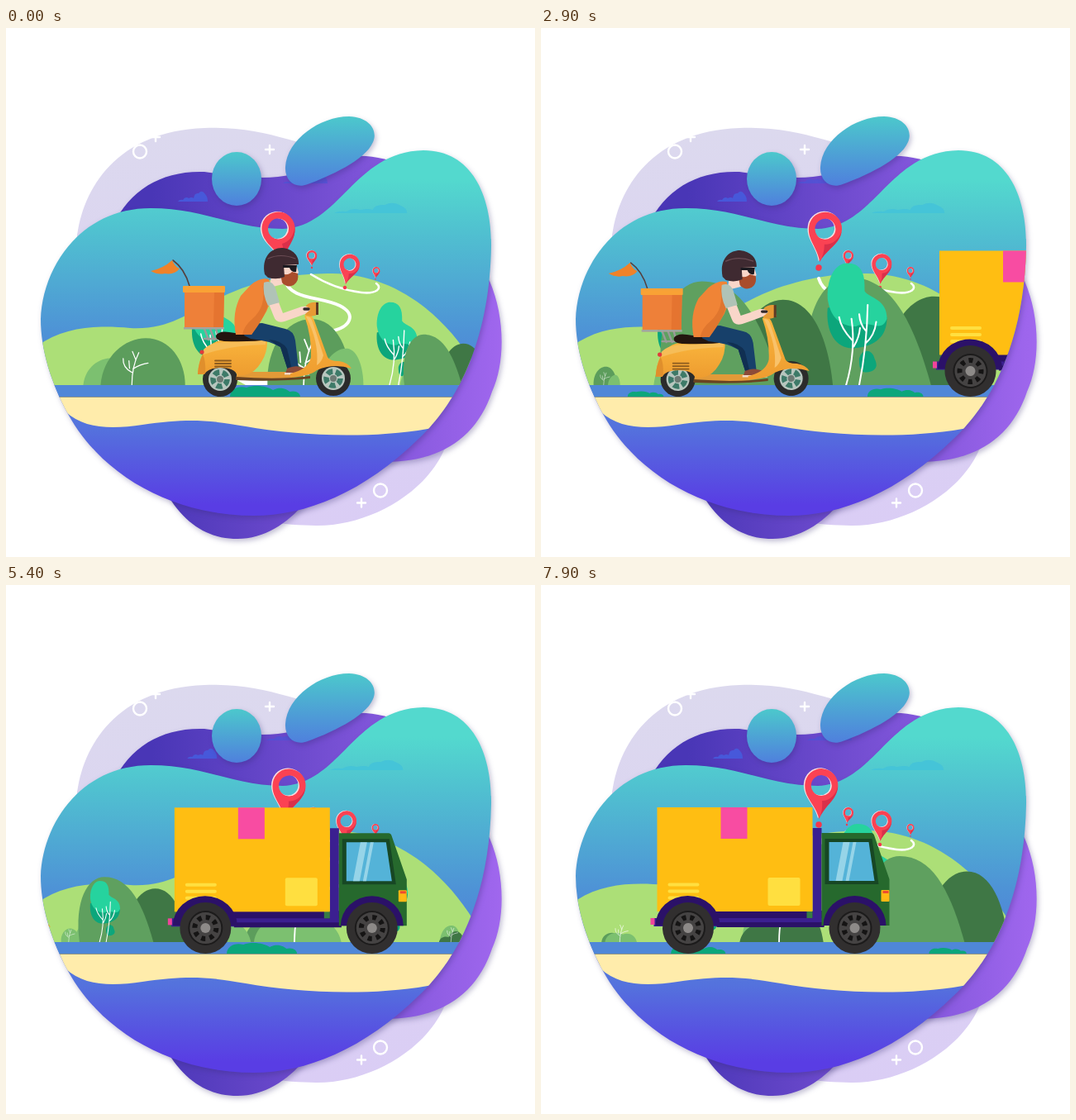
Animation, 640 px wide and 640 px high, one loop 8000 ms. Source, as an HTML page:

```html
<!DOCTYPE html>
<html lang="en">
<head>
<meta charset="utf-8">
<title>Delivery ride</title>
<style>
html, body { margin: 0; width: 100%; height: 100%; overflow: hidden; background: #fff; }
svg { display: block; width: 100vw; height: 100vh; }
.soft { filter: drop-shadow(2px 3px 3px rgba(50, 40, 110, .3)); }
.line { fill: none; stroke-linecap: round; stroke-linejoin: round; }
</style>
</head>
<body>
<svg viewBox="0 0 640 640" xmlns="http://www.w3.org/2000/svg">
  <defs>
    <linearGradient id="sky" gradientUnits="userSpaceOnUse" x1="0" y1="148" x2="0" y2="590">
      <stop offset=".08" stop-color="#53d9ce"/>
      <stop offset=".22" stop-color="#50c1d0"/>
      <stop offset=".5" stop-color="#4e92d6"/>
      <stop offset=".76" stop-color="#5472dd"/>
      <stop offset=".97" stop-color="#593de4"/>
    </linearGradient>
    <linearGradient id="violet" gradientUnits="userSpaceOnUse" x1="130" y1="0" x2="600" y2="0">
      <stop offset=".1" stop-color="#4936b6"/>
      <stop offset="1" stop-color="#a067ee"/>
    </linearGradient>
    <linearGradient id="drop" x1="0" y1="0" x2="0" y2="1">
      <stop offset="0" stop-color="#4cc8cc"/>
      <stop offset="1" stop-color="#4f80dd"/>
    </linearGradient>
    <linearGradient id="haze" x1="0" y1="0" x2="0" y2="1">
      <stop offset="0" stop-color="#dcd9ee"/>
      <stop offset="1" stop-color="#dacdf5"/>
    </linearGradient>
    <linearGradient id="paint" x1="0" y1="0" x2="0" y2="1">
      <stop offset="0" stop-color="#f9b53c"/>
      <stop offset="1" stop-color="#ee9c30"/>
    </linearGradient>
    <path id="blob" d="M42 352C44 290 90 218 175 218C240 218 275 243 335 243C405 240 420 150 505 148C565 148 588 205 587 265C585 370 552 440 512 484C440 560 365 590 300 590C200 590 115 540 75 467C55 430 42 390 42 352Z"/>
    <clipPath id="stage"><use href="#blob"/></clipPath>

    <path id="marker" fill-rule="evenodd" d="M0 -7C-6 -25-20 -31-20 -48A20 20 0 0 1 20 -48C20 -31 6 -25 0 -7ZM0 -60A12.5 12.5 0 1 0 0 -35A12.5 12.5 0 1 0 0 -60Z"/>
    <g id="pin">
      <use href="#marker" x="-1.500" y="-.7" fill="#fbdde0"/>
      <use href="#marker" fill="#fb4253"/>
      <path fill="#d9304a" d="M0 -7C6 -25 20 -31 20 -48C17 -34 9 -30 2 -29Q4 -18 0 -7Z"/>
      <circle r="3.7" fill="#f5374b"/>
    </g>

    <g id="twig" class="line" stroke="#fff" stroke-width="1.8">
      <path d="M-2 0Q-2 -32 10 -56M-2 -22Q-18 -30-17 -46M0 -28Q12 -36 26 -38M-6 -29L-7 -42M5 -43L-1 -58"/>
    </g>
    <g id="bush">
      <path fill="#7cc070" d="M-108 0C-104 -34-76 -50-50 -46C-28 -42-14 -20-8 0Z"/>
      <path fill="#5c9d5c" d="M-78 0C-74 -50-36 -81 0 -81C42 -81 68 -42 68 0Z"/>
      <use href="#twig" x="-22"/>
    </g>
    <g id="thicket">
      <path fill="#5c9d5c" d="M-54 0C-56 -48-30 -84 2 -84C34 -84 52 -44 52 0Z"/>
      <path fill="#7cc070" d="M12 0C14 -30 34 -50 50 -46C62 -42 68 -20 68 0Z"/>
      <use href="#twig" x="-6"/>
    </g>
    <g id="lump">
      <path fill="#7cc070" d="M-42 0C-46 -38-20 -68 6 -62C30 -58 44 -30 46 0Z"/>
      <use href="#twig" x="-6"/>
    </g>
    <g id="grove">
      <path fill="#5c9d5c" d="M-62 0C-60 -24-36 -36-16 -30L0 0Z"/>
      <path fill="#7cc070" d="M-50 0C-46 -30-10 -38 10 -26C34 -36 54 -20 58 0Z"/>
      <use href="#twig" x="2"/>
    </g>
    <g id="knoll">
      <path fill="#7cc070" d="M-48 0C-42 -50-18 -72 8 -66C28 -60 36 -30 36 0Z"/>
      <path fill="#3f7745" d="M-50 0C-46 -20-26 -26-10 -20C0 -52 44 -58 52 0Z"/>
      <use href="#twig"/>
    </g>
    <g id="hill">
      <path fill="#3f7745" d="M18 0C24 -74 54 -120 90 -120C132 -120 154 -62 160 0Z"/>
      <path fill="#7cc070" d="M-92 0C-88 -38-62 -58-40 -52L-20 0Z"/>
      <path fill="#5fa05f" d="M-80 0C-92 -92-62 -146-24 -146C32 -146 62 -86 86 0Z"/>
    </g>
    <g id="tree">
      <path fill="#0ca67b" d="M-33 -100C-36 -66-20 -46 2 -48C30 -50 44 -64 44 -88L0 -112ZM8 -30A10 12 0 0 1 28 -34Q34 -22 24 -18Q8 -12 8 -30Z"/>
      <path fill="#26d39e" d="M-33 -112C-34 -144-20 -158-8 -158C10 -158 16 -146 15 -122C22 -112 44 -112 44 -86C36 -66 22 -86 4 -76C-18 -76-30 -90-33 -112Z"/>
      <g class="line" stroke="#fff" stroke-width="2.2">
        <path d="M-9 0Q4 -44-2 -86M-1 -58Q-16 -74-18 -88M1 -50Q8 -62 9 -74M8 0Q18 -50 19 -104M16 -54Q28 -64 30 -82M17 -70Q9 -78 8 -92"/>
      </g>
    </g>
    <path id="shrub" fill="#0ca67b" d="M-42 0C-42 -9-32 -14-22 -11C-10 -15 4 -12 10 -8C20 -13 28 -8 30 -6C38 -8 43 -4 43 0Z"/>
    <path id="cloud" d="M0 12Q2 9 6 10Q9 5 13 8Q17 6 19 8Q20 1 25 2Q29 -3 33 3Q36 6 36 12Z"/>

    <g id="rim">
      <circle r="21" fill="#2b2b2b"/>
      <circle r="14" fill="#b7c6be"/>
      <circle r="8.500" fill="none" stroke="#3d7a68" stroke-width="6.500" stroke-dasharray="7 3.68"/>
      <circle r="4" fill="#6d7a74"/>
    </g>
    <g id="tyre">
      <circle r="31" fill="#312f2f"/>
      <circle r="20" fill="#454343" stroke="#1c1b1b" stroke-width="2"/>
      <circle r="13" fill="none" stroke="#151414" stroke-width="6" stroke-dasharray="5 5.21"/>
      <circle r="6" fill="#8d8a88"/>
    </g>
  </defs>

  <path fill="url(#haze)" d="M85 265C88 200 130 125 240 121C315 118 360 145 420 155L560 330L534 500C515 560 440 603 375 602C330 601 270 595 230 570Z"/>
  <path class="soft" fill="url(#violet)" d="M130 238C150 195 190 172 240 174C300 182 335 188 385 163C420 150 450 152 490 170L585 306C604 350 604 405 588 440C568 500 520 525 460 525L362 574C340 600 312 618 280 618C250 618 222 605 200 572Z"/>
  <g fill="#4758da">
    <use href="#cloud" id="cloudA"/>
    <use href="#cloud" id="cloudC" opacity=".6"/>
  </g>
  <use class="soft" href="#blob" fill="url(#sky)"/>
  <use href="#cloud" id="cloudB" fill="#45c4d8"/>

  <g clip-path="url(#stage)">
    <path fill="#acdf77" d="M42 382C75 360 115 360 150 363C205 366 225 338 285 315C330 300 360 297 395 297C465 298 525 340 566 406V433H42Z"/>
    <g class="line" stroke="#fff">
      <path stroke-width="2.6" d="M369 298C385 308 405 317 430 320C448 322 456 315 448 309"/>
      <path stroke-width="4" d="M336 303C344 330 380 324 404 336C424 346 418 362 392 367"/>
    </g>
    <path fill="#fff" d="M276 424Q300 429 330 425V432H290Z"/>
  </g>
  <g id="pins"></g>

  <g clip-path="url(#stage)">
    <g id="scenery"></g>
    <rect x="30" y="432" width="570" height="14.500" fill="#4f87d8"/>
    <g id="shrubs"></g>
    <path fill="#ffecab" d="M30 447H600V470L515 484C440 498 350 493 290 482C240 473 215 473 165 480C130 485 95 486 72 464L30 450Z"/>
    <path stroke="#8f9584" d="M30 446.500H600"/>

    <g id="scooter">
      <g transform="translate(259 425)"><use href="#rim" class="spin"/></g>
      <g transform="translate(396 424)"><use href="#rim" class="spin"/></g>
      <g id="ride">
        <g class="line">
          <path stroke="#54403f" stroke-width="1.6" d="M202 281Q216 291 222 312"/>
          <path stroke="#9a9a9a" stroke-width="2.4" d="M240 364L245 377M247 364L252 377M254 364L257 375M240 376H256"/>
        </g>
        <path fill="#ef8229" d="M175 294Q190 291 201 281Q205 290 210 291Q204 299 192 297Q184 299 175 294Z"/>
        <path fill="#ee8039" d="M216 318H264L263 362H216Z"/>
        <path fill="#e57430" d="M252 318H264L263 362H251Z"/>
        <rect x="214" y="312" width="51" height="8" rx="1" fill="#f9a235"/>
        <rect x="215" y="362" width="49" height="2.5" fill="#a5a39f"/>
        <path fill="#e39a38" d="M280 416H346V424Q320 427 278 425Z"/>
        <path fill="#6a4321" d="M278 422Q330 426 368 421V424Q330 428 278 426Z"/>
        <path fill="url(#paint)" d="M232 419C234 392 245 379 266 377L316 375Q317 392 309 404Q301 418 288 420H280Q276 411 260 411Q244 411 240 419Z"/>
        <path fill="#f6bd58" d="M239 389Q248 379 272 380L314 378V383Q270 384 239 395Z"/>
        <path fill="#e08f2c" d="M232 419Q233 404 238 395Q242 402 241 418Z"/>
        <path class="line" stroke="#8d5c1f" stroke-width="1.8" d="M253 402.500H272M253 406H272M253 409.500H272"/>
        <circle cx="237" cy="392" r="2.6" fill="#e23b3b"/>
        <path fill="#23150f" d="M254 372Q258 366 270 368Q290 371 316 372V377Q300 380 264 379Q253 378 254 372Z"/>

        <path fill="#17406a" d="M288 372Q294 357 310 357L338 364Q348 366 350 378L354 412L341 414L332 386Q318 378 296 376Z"/>
        <path fill="#102f52" d="M318 377Q334 378 340 388L346 413L341 414L332 386Z"/>
        <path fill="#8c4b38" d="M340 412Q350 408 355 410L367 413Q369 418 364 418H338Z"/>
        <path fill="#f1d9c8" d="M337 417H367V419.500H337Z"/>
        <path fill="url(#paint)" d="M361 348Q369 343 373 354L389 398Q391 403 403 403Q414 405 418 412Q396 405 376 414Q368 421 344 423V418Q366 413 369 398Q370 374 361 348Z"/>
        <path fill="#f9c26a" d="M363 349Q369 348 371 356L384 396Q382 404 376 408Q379 380 363 349Z"/>
        <path fill="#e79a34" d="M363 336Q368 331 376 332L378 346Q370 351 362 347Z"/>
        <path fill="#5e3a25" d="M375 332H378V347H375Z"/>

        <path fill="#f9d6c9" d="M321 299H335V310L319 314Z"/>
        <path fill="#f08436" d="M296 311Q308 301 318 304L322 322Q318 344 303 360Q299 368 297 371L278 371Q273 344 284 324Z"/>
        <path fill="#e0762e" d="M310 310Q316 336 298 352Q288 360 286 371L297 371Q316 346 318 330Z"/>
        <path fill="#f9d6c9" d="M318 334L330 332L335 345L358 337Q366 336 368 341L362 346L337 355Q327 358 324 349Z"/>
        <path fill="#b0c3b7" d="M312 308Q322 304 326 315L331 332L317 336Q310 322 312 308Z"/>
        <path class="line" stroke="#33292a" stroke-width="3.4" d="M361 340H366"/>
        <path fill="#f9d6c9" d="M331 285H351L354 296L350 300L333 304Z"/>
        <path fill="#a94d2c" d="M332 297Q342 300 346 295L353 297Q355 306 348 311Q340 315 334 308Z"/>
        <path fill="#3f2a31" d="M313 298C309 278 320 266 334 266C347 267 355 276 354 286L336 287L337 301Q328 305 317 302Z"/>
        <path class="line" stroke="#6b4d55" stroke-width="1.2" d="M317 279Q332 272 350 279"/>
        <path fill="#1c1a20" d="M335 287H352L351 295Q345 296 343 290H335Z"/>
      </g>
    </g>

    <g id="truck">
      <g id="load">
        <path fill="#2b1168" d="M246 394H390V410H246Z"/>
        <path fill="#3b1f90" d="M174 403H380V413H174ZM366 294H377V412H366Z"/>
        <path fill="#2b1168" d="M250 408H380V414H250Z"/>
        <rect x="170" y="403" width="5" height="8" fill="#f0449b"/>
        <rect x="359" y="394" width="7" height="9" fill="#377b45"/>
        <rect x="178" y="269" width="188" height="126" fill="#ffbe12"/>
        <rect x="255" y="269" width="32" height="38" fill="#f84ca2"/>
        <path class="line" stroke="#ffdf40" stroke-width="4" d="M193 362.500H227M193 370.500H227M193 378.500H227"/>
        <rect x="312" y="354" width="39" height="34" rx="2" fill="#ffdf40"/>
        <path fill="#26692d" d="M377 300H437Q440 300 441 304L459 356V412H377Z"/>
        <path fill="#174724" d="M381 307H438L446 362H381Z"/>
        <path fill="#54b3d8" d="M386 311H434L441 358H386Z"/>
        <path fill="#96d4e8" d="M403 311H411L402 358H394ZM415 311H419L410 358H406Z"/>
        <rect x="449" y="369" width="10" height="14" rx="1" fill="#ffb914"/>
        <path fill="#ee4a30" d="M451 370H458V373H451Z"/>
        <path fill="#2b1168" d="M176 412A39 36 0 0 1 254 412ZM379 412A38 36 0 0 1 455 412Z"/>
      </g>
      <g transform="translate(215.500 415)"><use href="#tyre" class="spin"/></g>
      <g transform="translate(417 415)"><use href="#tyre" class="spin"/></g>
    </g>
  </g>

  <ellipse class="soft" cx="279" cy="182.500" rx="30" ry="32.500" fill="url(#drop)"/>
  <path class="soft" fill="url(#drop)" d="M338 168C340 135 380 107 415 107C441 108 450 125 444 138C435 160 390 180 365 189C350 195 337 185 338 168Z"/>
  <g class="line" stroke="#fff" stroke-width="2.400">
    <circle cx="162" cy="149.500" r="8"/>
    <circle cx="453" cy="559.500" r="8"/>
    <path d="M176 132H186M181 127V137M314 147H324M319 142V152M425 574.500H435M430 569.500V579.500"/>
  </g>
</svg>

<script>
const LOOP = 8, STEP = 0.1;
const NS = "http://www.w3.org/2000/svg";
const byId = id => document.getElementById(id);
const move = (el, x, y, kx = 1, ky = kx) =>
  el.setAttribute("transform", `translate(${x} ${y}) scale(${kx} ${ky})`);

function place(parent, shape) {
  const el = document.createElementNS(NS, "use");
  el.setAttribute("href", "#" + shape);
  byId(parent).append(el);
  return el;
}

// Smooth curve through [time, value] keys that never overshoots.
function track(...keys) {
  const slope = i => (keys[i + 1][1] - keys[i][1]) / (keys[i + 1][0] - keys[i][0]);
  const tangent = i => {
    if (i === 0) return slope(0);
    if (i === keys.length - 1) return slope(i - 1);
    const a = slope(i - 1), b = slope(i);
    return a * b > 0 ? 2 * a * b / (a + b) : 0;
  };
  return t => {
    let i = 0;
    while (i < keys.length - 2 && t > keys[i + 1][0]) i++;
    const [t0, a] = keys[i], [t1, b] = keys[i + 1];
    const h = t1 - t0, u = (t - t0) / h, v = 1 - u;
    return a * v * v * (1 + 2 * u) + b * u * u * (3 - 2 * u)
      + h * u * v * (tangent(i) * v - tangent(i + 1) * u);
  };
}

const wave = (t, period, phase = 0) => Math.cos(2 * Math.PI * (t / period - phase));

// Scenery grows while crossing the stage and shrinks at both sides.
const grow = x => Math.max(0, Math.sin(Math.PI * Math.min(1, Math.max(0, (x - 30) / 563))));

// Back to front: shape, starting distance from the middle, size.
const scenery = [
  ["tree", 949], ["lump", 969], ["hill", 1014],
  ["knoll", 848], ["tree", 744], ["grove", 632], ["grove", 525],
  ["lump", 332], ["hill", 404], ["tree", 386], ["tree", 166],
  ["hill", 222], ["thicket", 57], ["tree", -63, .75], ["bush", -147]
].map(([shape, start, size = 1]) => ({ el: place("scenery", shape), start, size }));

const shrubs = [0, 1, 2].map(() => place("shrubs", "shrub"));

const pins = [
  [447, 304, .22, t => .5 + .5 * wave(t, 1.2)],
  [370, 290, .31, t => 1 - wave(t, 1.2)],
  [410, 314, .6, t => 4 + 2 * wave(t, 1.2)],
  [336, 290, 1, t => 8 * wave(t, 1.2, .4)]
].map(([x, y, k, sway]) => ({ el: place("pins", "pin"), x, y, k, sway }));

const truckX = track([0, 655], [1, 640], [2.1, 581], [2.9, 519], [4, 382],
  [4.7, 299], [6, 216], [6.7, 215], [7.9, 177.5]);
const cloudA = track([0, 208], [2.1, 208.5], [2.9, 213], [4, 218], [4.7, 221], [6.3, 215], [7.9, 208]);
const cloudB = track([0, 397], [2.1, 403], [2.9, 400], [4, 395], [4.7, 392], [6.3, 393], [7.9, 399]);
const cloudC = track([0, 335], [2.1, 314], [2.9, 310], [4, 305], [4.7, 306], [6.3, 327], [7.9, 322]);

function scooterShift(t) {
  const s = Math.max(0, t - .94);
  return -(29 - 2.4 * s) * s * s;
}

const spinning = document.querySelectorAll(".spin");

function draw(t) {
  for (const { el, start, size } of scenery) {
    const w = Math.max(-340, Math.min(340, start - 110 * t));
    const x = 311 + w - 1.6e-6 * w ** 3;
    move(el, x, 432, size * grow(x));
  }
  const first = ((313 - 168.5 * t) % 302 + 302) % 302;
  shrubs.forEach((el, i) => {
    const x = first + 302 * i;
    move(el, x, 446, grow(x));
  });
  for (const { el, x, y, k, sway } of pins) {
    const turn = Math.atan(sway(t) / (47 * k)) * 180 / Math.PI;
    el.setAttribute("transform", `translate(${x} ${y}) scale(${k}) rotate(${turn})`);
  }
  move(byId("cloudA"), cloudA(t), 198);
  move(byId("cloudB"), cloudB(t), 212, 2.45, 1);
  move(byId("cloudC"), cloudC(t), 176, 1.5, 1);

  move(byId("scooter"), scooterShift(t), 0);
  move(byId("ride"), 0, 2 - 2 * wave(t, .867));
  move(byId("truck"), truckX(t) - 215, 0);
  move(byId("load"), 0, .9 * wave(t, 1.2, .4) - .4);
  spinning.forEach(el => el.setAttribute("transform", `rotate(${t * 400 % 360})`));
}

function tick(now) {
  const t = now / 1000 % LOOP;
  draw(Math.floor(t / STEP + 1e-6) * STEP);
  requestAnimationFrame(tick);
}
draw(0);
requestAnimationFrame(tick);
</script>
</body>
</html>
```
